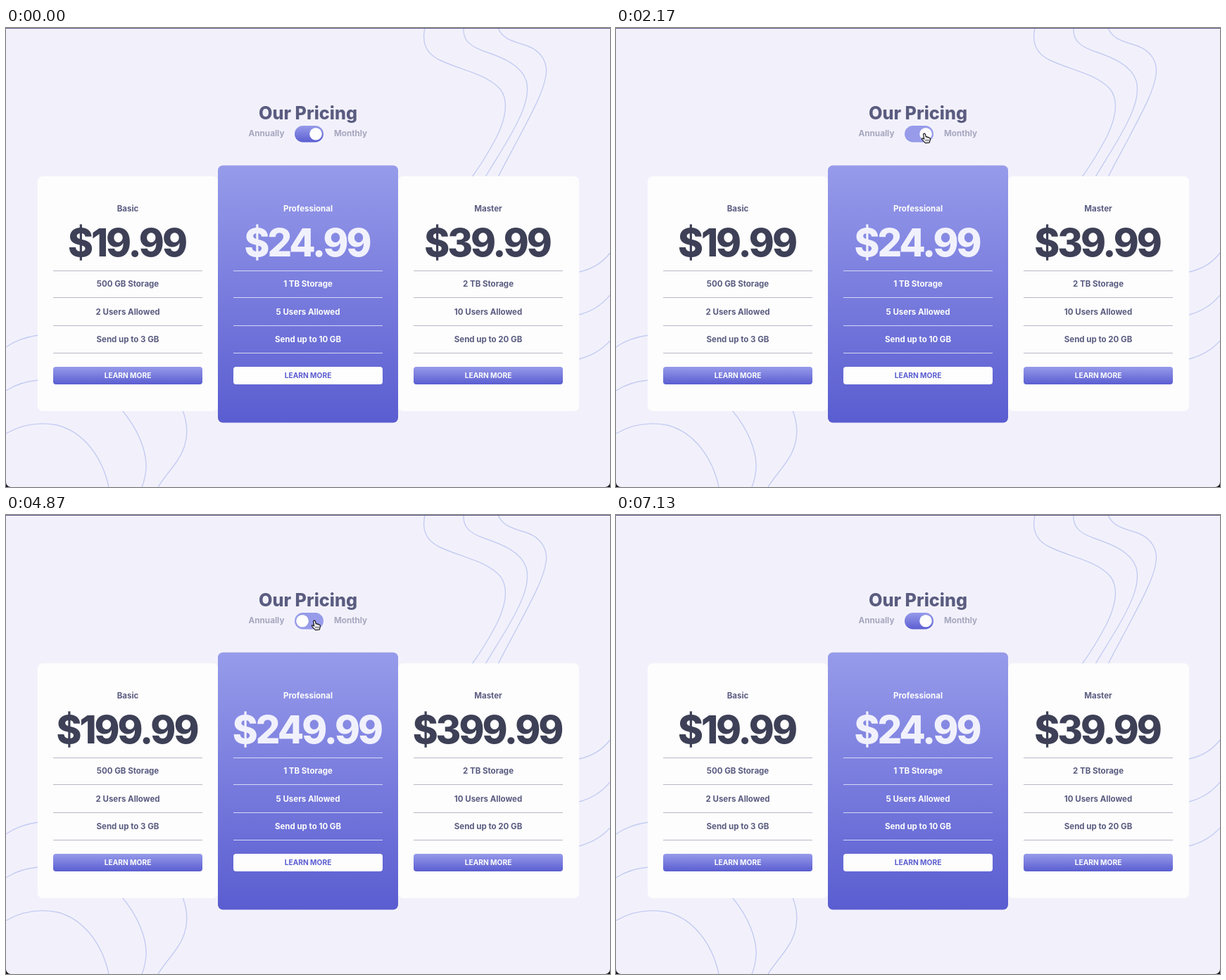
An HTML page with a canvas that plays this animation: 858x653 px, repeating every 7160 ms.

```html
<!DOCTYPE html>
<html lang="en">
<head>
<meta charset="utf-8">
<title>Our Pricing</title>
<style>
  html, body { margin: 0; width: 100%; height: 100%; overflow: hidden; background: #f2f1fb; }
  canvas { display: block; width: 858px; height: 653px; }
</style>
</head>
<body>
<canvas id="stage" width="858" height="653"></canvas>
<script>
const ctx = document.getElementById('stage').getContext('2d');
const LOOP = 7160;
const FONT = 'Inter, "Open Sans", sans-serif';
const LIGHT = '#979bea', DEEP = '#5a5dd0';
const INK = '#5a5c80', PRICE = '#3d4056', PALE = '#a6a6bf', WHITE = '#fdfdfd';

const plans = [
  { x: 45, name: 'Basic', month: '$19.99', year: '$199.99',
    items: ['500 GB Storage', '2 Users Allowed', 'Send up to 3 GB'] },
  { x: 557, name: 'Master', month: '$39.99', year: '$399.99',
    items: ['2 TB Storage', '10 Users Allowed', 'Send up to 20 GB'] },
  { x: 301, name: 'Professional', month: '$24.99', year: '$249.99', featured: true,
    items: ['1 TB Storage', '5 Users Allowed', 'Send up to 10 GB'] }
];

const waves = new Path2D([
  'M595 0C591 18 595 36 617 46C646 60 683 65 702 87C716 105 708 132 697 155C687 174 675 194 662 212',
  'M650 0C649 15 656 25 679 33C706 42 732 53 739 75C746 100 728 133 713 159C702 178 691 195 681 212',
  'M699 0C706 17 722 19 742 26C760 33 770 49 767 67C764 91 744 126 728 157C718 176 708 194 699 212',
  'M814 347Q842 341 858 320',
  'M814 408Q841 401 858 380',
  'M814 471Q841 464 858 445',
  'M0 454Q18 441 46 437',
  'M0 516Q20 503 46 501',
  'M165 544C187 570 200 601 199 626Q198 641 193 653',
  'M251 544C260 568 259 593 243 616C235 628 224 640 216 653',
  'M0 577C22 564 47 560 73 565C111 575 137 611 146 653'
].join(''));

const hand = new Path2D('M-1.4 1.2Q0 -.8 1.4 1.2L2.2 4.9Q3.8 4.3 4.5 5.6' +
  'Q6 5 6.7 6.3Q8.2 6 8.4 7.5L8 10.6L7 13.2L1.5 13.6Q-1.8 10.6 -3.6 8Q-3.4 6.2 -1.7 7.2L-.3 8.1Z');

function fade(y0, y1) {
  const g = ctx.createLinearGradient(0, y0, 0, y1);
  g.addColorStop(0, LIGHT);
  g.addColorStop(1, DEEP);
  return g;
}

function box(x, y, w, h, r, fill) {
  ctx.fillStyle = fill;
  ctx.beginPath();
  ctx.roundRect(x, y, w, h, r);
  ctx.fill();
}

function text(str, x, y, size, color, weight = 700, spacing = 0) {
  ctx.font = `${weight} ${size}px ${FONT}`;
  ctx.letterSpacing = spacing + 'px';
  ctx.fillStyle = color;
  ctx.fillText(str, x + spacing / 2, y);
}

function drawCard(plan, yearly) {
  const { x, featured } = plan, mid = x + 128;
  const ink = featured ? WHITE : INK;
  if (featured) box(x, 195.5, 256, 366, 7, fade(195, 561));
  else box(x, 211, x > 500 ? 257 : 256, 334, 7, WHITE);

  text(plan.name, mid, 261, 11.5, ink);
  text(yearly ? plan.year : plan.month, mid, 325, 54.5, featured ? '#f1f1fd' : PRICE, 800, -3);
  plan.items.forEach((item, i) => text(item, mid, 368.3 + i * 39.2, 11.5, ink));

  ctx.fillStyle = featured ? '#d5d7f6' : '#b7b8c9';
  for (const y of [345, 383, 423, 462]) ctx.fillRect(x + 22, y, 212, 1);

  box(x + 22, 482, 212, 25, 4, featured ? WHITE : fade(482, 507));
  text('LEARN MORE', mid, 498, 10.2, featured ? DEEP : WHITE);
}

function drawToggle(yearly, hover) {
  box(410, 139, 41, 23.5, 12, hover ? LIGHT : fade(139, 163));
  ctx.fillStyle = WHITE;
  ctx.beginPath();
  ctx.arc(yearly ? 421 : 440, 150.8, 8.8, 0, Math.PI * 2);
  ctx.fill();
}

// Pointer keys: time, x, y
const route = [[1060, 492, 177], [1230, 449, 151], [1400, 438, 150],
  [5330, 438, 150], [5650, 496, 182]];

function pointerAt(t) {
  for (let i = 1; i < route.length; i++) {
    const [t0, x0, y0] = route[i - 1], [t1, x1, y1] = route[i];
    if (t >= t0 && t <= t1) {
      const k = (t - t0) / (t1 - t0);
      return { x: x0 + (x1 - x0) * k, y: y0 + (y1 - y0) * k };
    }
  }
  return null;
}

function drawPointer(p) {
  ctx.save();
  ctx.translate(p.x, p.y);
  ctx.fillStyle = '#fff';
  ctx.strokeStyle = '#15151c';
  ctx.lineWidth = 1.2;
  ctx.lineJoin = 'round';
  ctx.fill(hand);
  ctx.stroke(hand);
  ctx.lineWidth = 0.8;
  ctx.beginPath();
  for (const x of [2, 4, 6]) {
    ctx.moveTo(x, 8.5);
    ctx.lineTo(x, 11.3);
  }
  ctx.stroke();
  ctx.restore();
}

function draw(t) {
  const yearly = t >= 2600 && t < 5130;
  const p = pointerAt(t);
  const hover = p && p.x < 447 && p.y < 163;

  ctx.fillStyle = '#17171f';
  ctx.fillRect(0, 0, 858, 653);
  box(0, 0, 858, 653, [0, 0, 7, 7], '#f2f1fb');
  ctx.strokeStyle = '#c5ccf2';
  ctx.lineWidth = 1.4;
  ctx.stroke(waves);
  ctx.fillStyle = '#5b5986';
  ctx.fillRect(0, 0, 858, 1);

  ctx.textAlign = 'center';
  text('Our Pricing', 429, 130, 25.2, INK, 800);
  text('Annually', 370, 154, 11.7, PALE);
  text('Monthly', 489.5, 154, 11.7, PALE);
  drawToggle(yearly, hover);
  plans.forEach(plan => drawCard(plan, yearly));
  if (p) drawPointer(p);
}

function tick() {
  draw(performance.now() % LOOP);
  requestAnimationFrame(tick);
}
tick();
</script>
</body>
</html>
```
